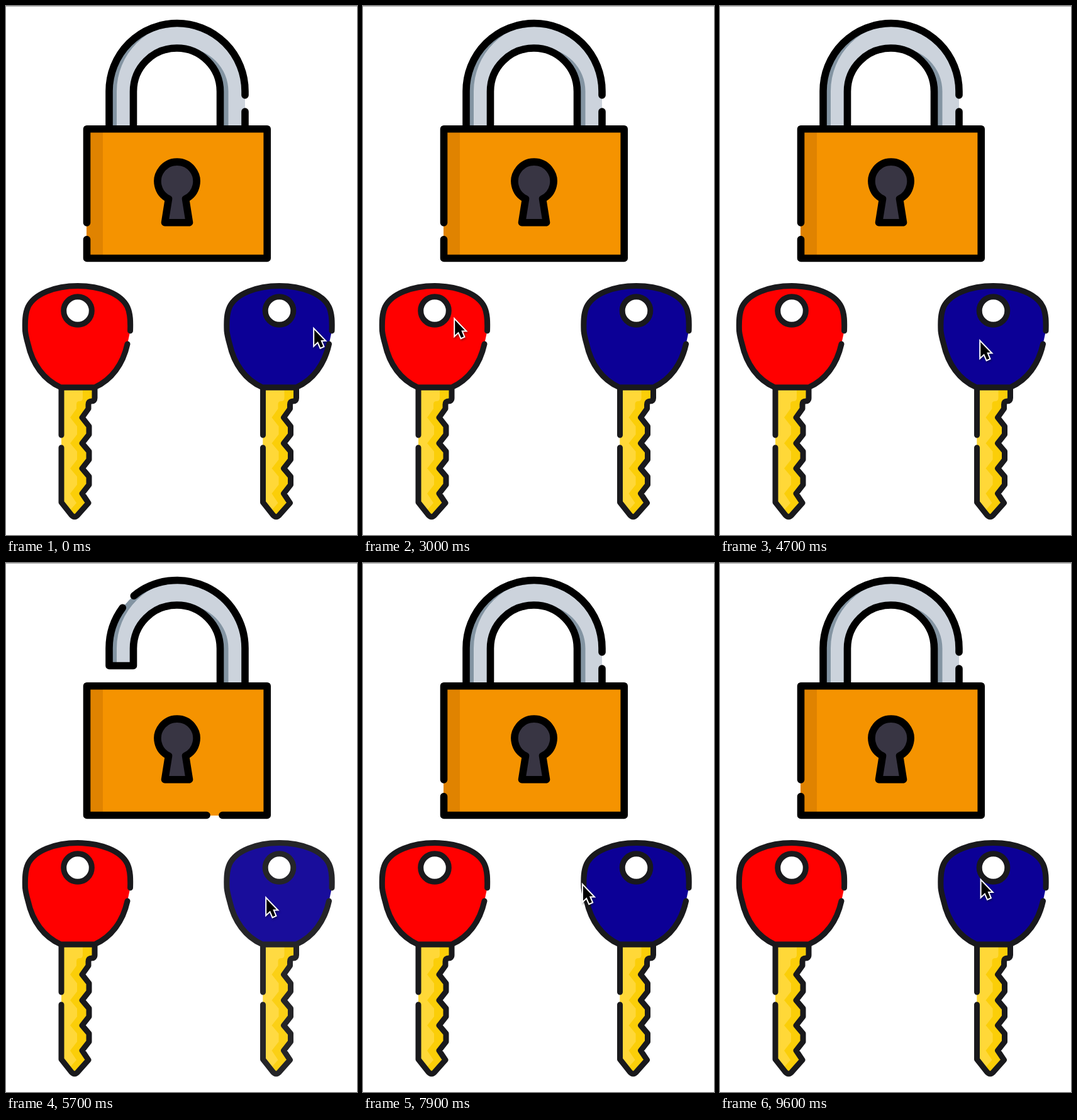
An HTML page that plays this animation: 558x842 px, repeating every 9700 ms.

```html
<!DOCTYPE html>
<html lang="en">
<head>
<meta charset="utf-8">
<title>Lock and two keys</title>
<style>
  html, body { margin: 0; width: 100%; height: 100%; overflow: hidden; background: #fff; }
  svg { display: block; }
  .line { fill: none; stroke: #000; stroke-width: 11.6; stroke-linecap: round; stroke-linejoin: round; }
  .thin { stroke: #19191c; stroke-width: 9; }
  #pointer { filter: drop-shadow(1px 2px 1.5px rgba(0, 0, 0, .4)); }
</style>
</head>
<body>
<svg width="558" height="842" viewBox="0 0 558 842">
  <defs>
    <path id="blade" d="M88 607H141V624Q141 629 136 629Q131 629 131 634V641L121 655L132 669V682L121 696L132 709V722L121 736L132 749V762L121 776L131 791L115 809Q109 817 103 809L88 790Z"/>
    <clipPath id="bladeClip"><use href="#blade"/></clipPath>
    <g id="key">
      <use href="#blade" fill="#fbce08"/>
      <g clip-path="url(#bladeClip)"><use href="#blade" x="-19" fill="#ffd838"/></g>
      <path class="line thin" d="M88 683V607H141V624Q141 629 136 629Q131 629 131 634V641L121 655L132 669V682L121 696L132 709V722L121 736L132 749V762L121 776L131 791L115 809Q109 817 103 809L88 790V703"/>
      <path class="line thin" style="fill:currentColor" d="M197.5 517C198 503 198 490 193 479C183 458 150 445.5 114 445.5C78 445.5 45 458 35 479C30 490 30 503 30.5 517C31.2 524 33 531 35 538C42 570 60 595 87 607H141C168 595 186 570 193 538"/>
      <circle class="line thin" style="fill:#fff" cx="114" cy="485" r="22.3"/>
    </g>
  </defs>

  <path d="M0 .5H558" stroke="#a6a6a6"/>

  <path id="steel" fill="#ccd3dc"/>
  <g fill="#8394a2">
    <path id="shade"/>
    <path d="M340.5 195V136A69 69 0 0 0 271.5 67H284.5A69 69 0 0 1 353.5 136V195Z"/>
  </g>
  <path id="shackle" class="line"/>
  <path d="M128 195H416V402H128Z" fill="#f59300"/>
  <path d="M128 195H154V402H128Z" fill="#e08300"/>
  <path id="body" class="line"/>
  <path class="line" style="fill:#383543" d="M258.5 307A31 31 0 1 1 285.5 307L291.5 344.7H252.5Z"/>

  <use id="red" href="#key" color="#f00"/>
  <use id="blue" href="#key" x="320.5" color="#0c0096"/>

  <path id="pointer" d="M2.2 5V28.8L7.9 23.4L12.1 33L16.2 31.2L12.2 21.6H18Z" stroke="#fff" stroke-width="4" paint-order="stroke"/>
</svg>
<script>
const LOOP = 9.7;
const $ = id => document.getElementById(id);

// Pressing blue opens the lock, pressing red closes it.
const presses = [
  [.3, 'blue'], [1.85, 'red'], [2.5, 'red'], [3.2, 'red'], [4, 'red'],
  [4.8, 'blue'], [5.28, 'blue'], [6.45, 'blue'],
  [7.2, 'red'], [8.3, 'blue'], [8.97, 'red']
];

// Pointer stops: time, x, y
const stops = [
  [-.394, 128, 467], [.026, 492, 511], [.7, 492, 511], [1.5, 107, 579],
  [2.6, 107, 579], [3, 144, 495], [4.15, 144, 495], [4.7, 412, 530],
  [6.75, 412, 530], [7.15, 130, 540], [7.45, 130, 540], [8.05, 388, 503],
  [8.5, 388, 503], [8.9, 128, 467], [9.306, 128, 467], [9.726, 492, 511]
];

const ARC = 'A108 108 0 0 1 ';
const INNER = 'V136A69 69 0 0 1 340.5 136V195';

function drawLock(open) {
  const foot = open ? 163.5 : 195;
  $('steel').setAttribute('d',
    `M164 ${foot}V135.5${ARC}380 135.5V195H340.5V136A69 69 0 0 0 202.5 136V${foot}Z`);
  $('shade').setAttribute('d',
    `M164 ${foot}V135.5${ARC}272 27.5H284A108 108 0 0 0 176 135.5V${foot}Z`);
  $('shackle').setAttribute('d', open
    ? `M185.3 71.2A108 108 0 0 0 164 135.5V163.5H202.5${INNER}M203.3 52.2${ARC}380 135.5V195`
    : `M164 195V135.5${ARC}380 135.5V142M380 168V195M202.5 195${INNER}`);
  $('body').setAttribute('d', open
    ? 'M344 401.5H415.2V195.7H128.5V401.5H319'
    : 'M128.5 345V195.7H415.2V401.5H128.5V371.5');
}

function keyOpacity(name, t) {
  let fade = 0;
  for (const [at, key] of presses) {
    const age = t - at;
    if (key === name) fade = Math.max(fade, Math.min(age / .1, 1, (.45 - age) / .3));
  }
  return 1 - .55 * fade;
}

function pointerAt(t) {
  const i = stops.findIndex(stop => stop[0] > t);
  const [t0, x0, y0] = stops[i - 1], [t1, x1, y1] = stops[i];
  const p = (t - t0) / (t1 - t0), s = p * p * (3 - 2 * p);
  return [x0 + (x1 - x0) * s, y0 + (y1 - y0) * s];
}

function render(t) {
  const last = presses.filter(([at]) => at + .1 <= t).pop();
  drawLock(last !== undefined && last[1] === 'blue');
  for (const name of ['red', 'blue']) $(name).setAttribute('opacity', keyOpacity(name, t));
  $('pointer').setAttribute('transform', `translate(${pointerAt(t)})`);
}

const start = performance.now();
function tick() {
  const seconds = (performance.now() - start) / 1000 % LOOP;
  render(Math.floor(seconds * 10) / 10); // ten pictures a second
  requestAnimationFrame(tick);
}
tick();
</script>
</body>
</html>
```
